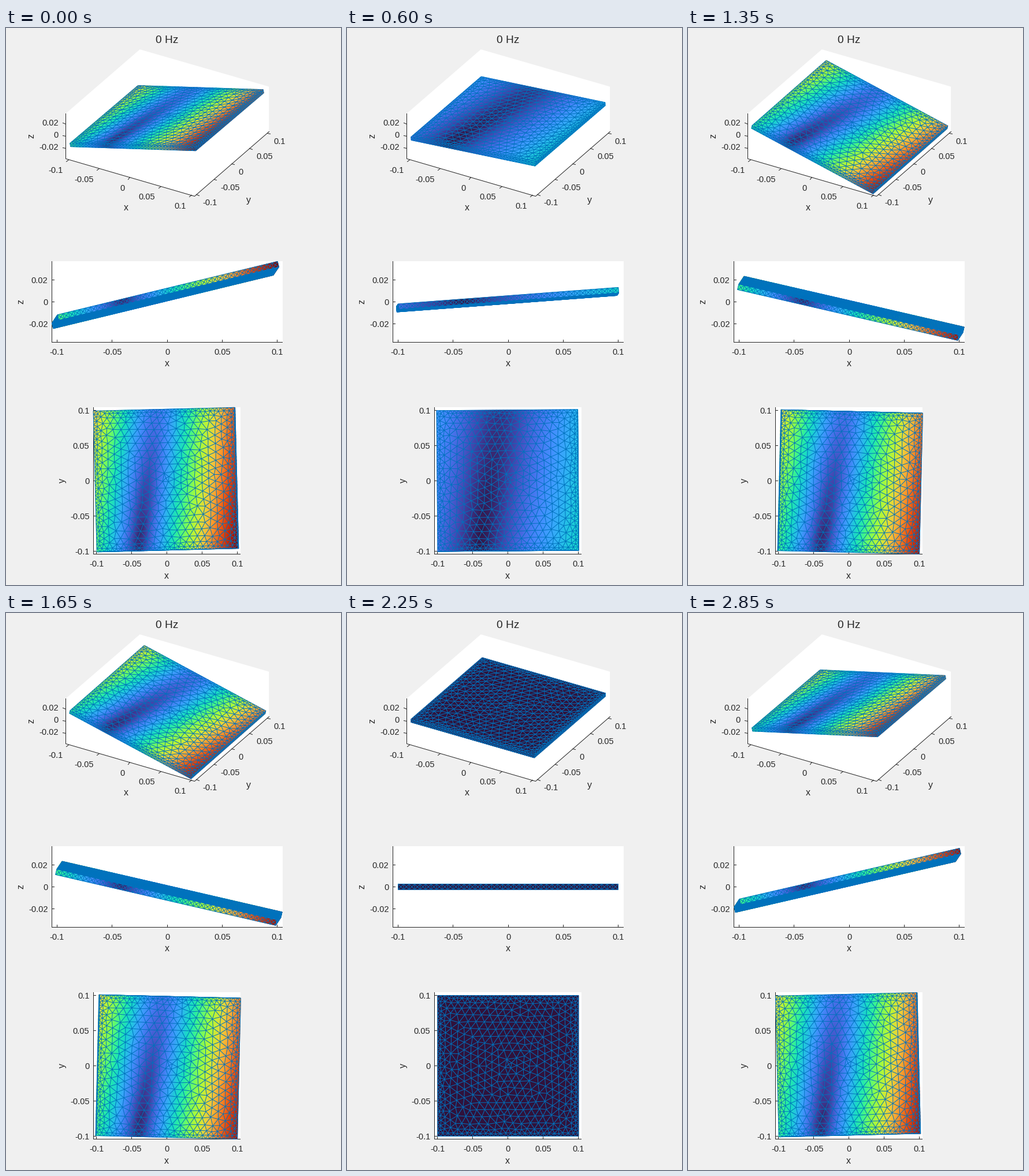
These frames come from a looping animation (580x965 px, 3 s). A matplotlib script:

```python
import numpy as np
import matplotlib.pyplot as plt
from matplotlib.animation import FuncAnimation
from matplotlib.collections import LineCollection
from matplotlib.tri import Triangulation

W, H, DPI = 580, 965, 100
PX = 72 / DPI                      # one pixel in points
FRAMES, INTERVAL = 20, 150
INK, BLUE, BACK = "#262626", "#0072bd", "#f0f0f0"
plt.rcParams["font.family"] = "Liberation Sans"

HALF, THICK = 0.1, 0.0025          # half width and half thickness of the plate
LIM, ZLIM = 0.1047, 0.0367         # axis limits
SHIFT = np.array([-0.0016, 0.0016, 0.0062])
SPIN = np.array([-0.0378, -0.2427, 0.0252])


# ---- mesh -------------------------------------------------------------

def ring(s, n, phase):
    """Points along a square of half side s, n per side, anticlockwise."""
    t = (np.arange(4 * n) + phase) / n
    side, u = t.astype(int), s * (2 * (t % 1) - 1)
    flat = np.full_like(u, s)
    x = np.choose(side, [u, flat, -u, -flat])
    y = np.choose(side, [-flat, u, flat, -u])
    return np.column_stack([x, y])


def sheet():
    """Graded triangle mesh of the square, finest along the rim."""
    rng = np.random.default_rng(4)
    parts, d, phase = [], 0.0, 0.0
    while d < HALF - 0.002:
        h = min(0.0115, 0.005 + 0.4 * d)
        s = HALF - d
        pts = ring(s, max(1, round(2 * s / h)), phase)
        if parts:
            pts += rng.normal(0, 0.12 * h, pts.shape)
        parts.append(pts)
        d += 0.866 * h
        phase = 0.5 - phase
    rim = len(parts[0])
    p = np.vstack(parts)
    for _ in range(4):
        e = Triangulation(p[:, 0], p[:, 1]).edges
        total, count = np.zeros_like(p), np.zeros(len(p))
        for a, b in ((0, 1), (1, 0)):
            np.add.at(total, e[:, a], p[e[:, b]])
            np.add.at(count, e[:, a], 1)
        mean = total / count[:, None]
        p[rim:] += 0.5 * (mean - p)[rim:]
    return p, Triangulation(p[:, 0], p[:, 1]).triangles, rim


def plate():
    """Closed surface: top and bottom sheets joined by crossed side cells."""
    p, tri, rim = sheet()
    n = len(p)
    i = np.arange(rim)
    j = (i + 1) % rim
    c = 2 * n + i
    mid = (p[i] + p[j]) / 2
    nodes = np.vstack([
        np.column_stack([p, np.full(n, THICK)]),
        np.column_stack([p, np.full(n, -THICK)]),
        np.column_stack([mid, np.zeros(rim)]),
    ])
    sides = [np.column_stack(t) for t in
             ((i + n, j + n, c), (j + n, j, c), (j, i, c), (i, i + n, c))]
    return nodes, np.vstack([tri, tri[:, ::-1] + n] + sides)


NODES, FACES = plate()
MODE = SHIFT + np.cross(SPIN, NODES)
SIZE = np.linalg.norm(MODE, axis=1)


# ---- views: pixel position = centre + nodes @ matrix ------------------

def camera(cx, cy, scale, az, el):
    a, e = np.radians([az, el])
    m = scale * np.array([[np.cos(a), np.sin(a) * np.sin(e)],
                          [np.sin(a), -np.cos(a) * np.sin(e)],
                          [0, -np.cos(e)]])
    return lambda r: np.array([cx, cy]) + np.asarray(r) @ m


iso = camera(279.2, 164.1, 1232, 30, 30)
front = camera(279, 474.4, 1905, 0, 0)
top = camera(278.9, 784.5, 1220, 0, 90)

# ---- static parts -----------------------------------------------------

fig = plt.figure(figsize=(W / DPI, H / DPI), dpi=DPI, facecolor=BACK)
ax = fig.add_axes([0, 0, 1, 1])
ax.set_xlim(0, W)
ax.set_ylim(H, 0)
ax.axis("off")


def text(x, y, s, size=14.6, ha="center", rot=0):
    ax.text(x, y, s, size=size * PX, ha=ha, va="center", color=INK,
            rotation=rot)


def number(x, y, v, ha="center"):
    text(x, y + 1.2, f"{v:g}", ha=ha)


def line(*pts):
    """Thin line through pixel centres."""
    x, y = np.floor(pts).T + 0.5
    ax.plot(x, y, color=INK, lw=PX, solid_capstyle="projecting",
            snap=False, zorder=2)


def tick(p, dx, dy):
    line(p, (p[0] + dx, p[1] + dy))


def white(pts):
    ax.fill(*zip(*pts), color="white", lw=0, snap=False, zorder=1)


WIDE = (-0.1, -0.05, 0, 0.05, 0.1)
TALL = (-0.02, 0, 0.02)


def iso_axes():
    a, b, z = LIM, 0.1043, ZLIM
    hull = iso([(-a, -b, z), (-a, b, z), (a, b, z),
                (a, b, -z), (a, -b, -z), (-a, -b, -z)])
    white(hull)
    line(hull[0], hull[5], hull[4], hull[3])
    for v in WIDE:
        p = iso((v, -b, -z))
        tick(p, -3.8, 3.3)
        number(p[0] - 9.8, p[1] + 17.9, v, "right")
        p = iso((a, v, -z))
        tick(p, 4.8, 1.4)
        number(p[0] + 11.2, p[1] + 13.2, v, "left")
    for v in TALL:
        p = iso((-a, -b, v))
        tick(p, -4.8, -1.4)
        number(91, p[1] - 2.6, v, "right")
    text(208, 311, "x", 16)
    text(420, 298.5, "y", 16)
    text(44, 187, "z", 16, rot=90)


def flat_axes(box, cam, axis, values, gap, names):
    """Axis lines run along the first column and last row of the box."""
    x0, y0, x1, y1 = box
    white([(x0, y0), (x1, y0), (x1, y1), (x0, y1)])
    base = y1 - 1
    line((x0, y0), (x0, base), (x1 - 1, base))
    for v in WIDE:
        x = cam((v, 0, 0))[0]
        tick((x, base), 0, -4)
        number(x, base + gap, v)
    for v in values:
        r = np.zeros(3)
        r[axis] = v
        y = cam(r)[1]
        tick((x0, y), 4, 0)
        number(x0 - 6.5, y, v, "right")
    for x, y, s, rot in names:
        text(x, y, s, 16, rot=rot)


text(278.5, 21.2, "0 Hz", 19.2)
iso_axes()
flat_axes((79, 404, 479, 545), front, 2, TALL, 17,
          [(279, 582, "x", 0), (26, 474.5, "z", 90)])
flat_axes((151, 657, 406, 912), top, 1, WIDE, 17,
          [(278, 949, "x", 0), (97.5, 784.5, "y", 90)])

# ---- motion -----------------------------------------------------------

artists = []


def visible(q):
    """Faces turned towards the viewer (screen y runs down)."""
    a, b, c = (q[FACES[:, k]] for k in range(3))
    u, v = b - a, c - a
    return FACES[u[:, 0] * v[:, 1] - u[:, 1] * v[:, 0] < -0.01]


def draw_plate(q, value):
    faces = visible(q)
    skin = ax.tripcolor(q[:, 0], q[:, 1], faces, value, shading="gouraud",
                        cmap="turbo", vmin=0, vmax=SIZE.max(), zorder=3)
    pairs = np.vstack([faces[:, [0, 1]], faces[:, [1, 2]], faces[:, [2, 0]]])
    edges = np.unique(np.sort(pairs, axis=1), axis=0)
    wire = LineCollection(q[edges], colors=BLUE, linewidths=PX,
                          snap=False, zorder=4)
    ax.add_collection(wire, autolim=False)
    artists.extend([skin, wire])


def update(n):
    while artists:
        artists.pop().remove()
    swing = np.cos(2 * np.pi * n / FRAMES)
    nodes = NODES + swing * MODE
    for cam in (iso, front, top):
        draw_plate(cam(nodes), abs(swing) * SIZE)
    return artists


anim = FuncAnimation(fig, update, frames=FRAMES, interval=INTERVAL,
                     repeat=True, repeat_delay=0, blit=False)
plt.show()
```
